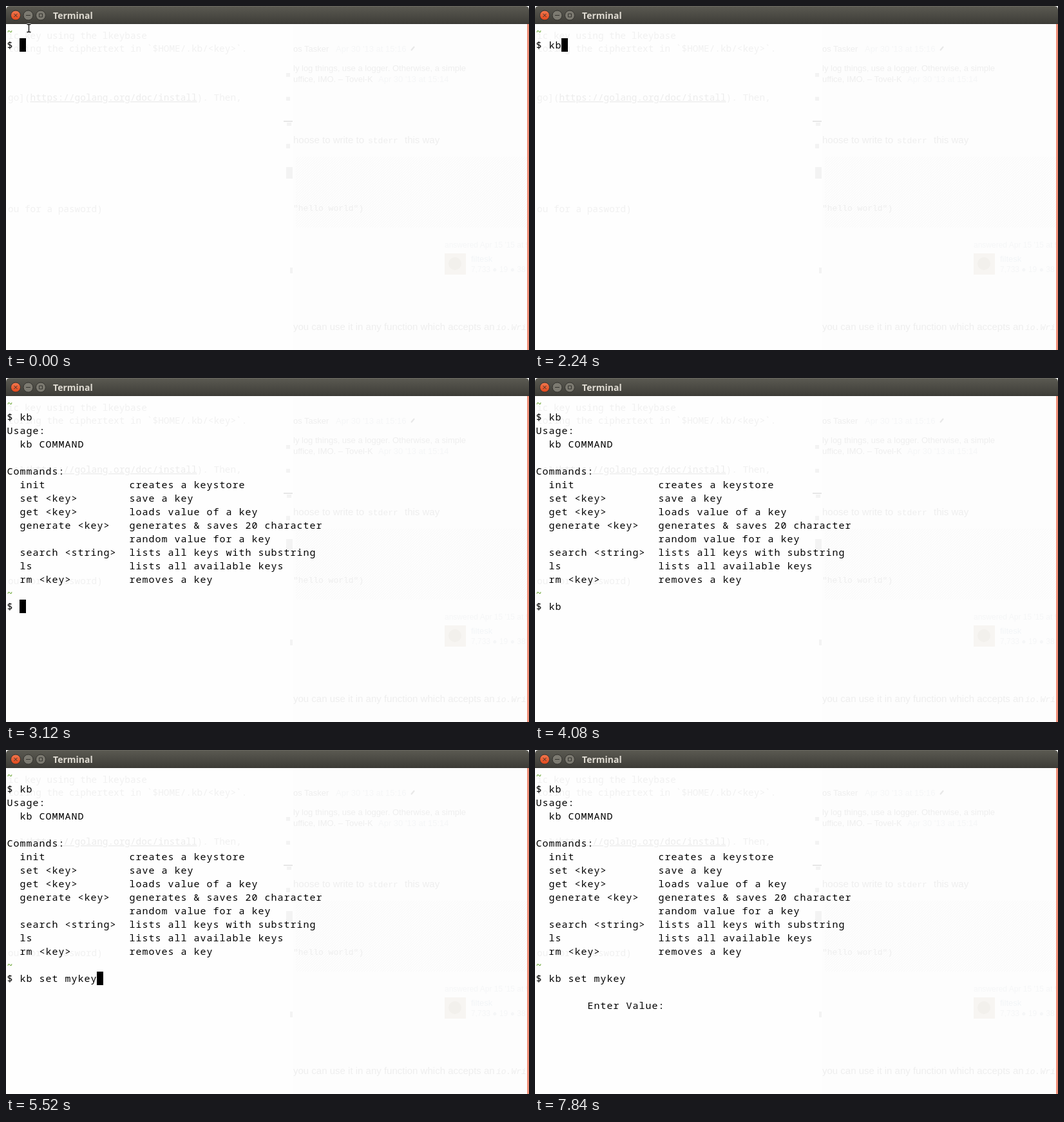
An HTML page that plays this animation: 812x534 px, repeating every 8 s.

```html
<!DOCTYPE html>
<html lang="en">
<head>
<meta charset="utf-8">
<title>Terminal</title>
<style>
  html, body { margin: 0; width: 100%; height: 100%; overflow: hidden; background: #fff; }
  svg, pre, #cursor { position: absolute; }
  svg { left: 0; top: 0; }
  text { white-space: pre; }
  .mono { font-family: "Noto Sans Mono", monospace; font-size: 14.4px; }
  .sans { font-family: "Liberation Sans", sans-serif; font-size: 13px; }
  .large { font-size: 15px; }
  .small { font-size: 12px; }
  .code { font-family: "Liberation Mono", monospace; font-size: 13px; }
  .pale { fill: #f5f6f7; }
  #title { font: bold 14px "Open Sans", sans-serif; fill: #dfdbd2; }
  #screen {
    left: 1.5px; top: 29px; margin: 0; color: #000;
    font: 500 15px/21px "Noto Sans Mono", monospace; letter-spacing: 1px;
  }
  #screen i { font-style: normal; color: #579a1c; }
  #cursor { width: 10px; height: 21px; background: #000; }
</style>
</head>
<body>
<svg width="812" height="534">
  <defs>
    <linearGradient id="bar" x2="0" y2="1">
      <stop offset="0" stop-color="#5b5a52"/>
      <stop offset="1" stop-color="#3d3c37"/>
    </linearGradient>
    <linearGradient id="close" x2="0" y2="1">
      <stop offset="0" stop-color="#f2784f"/>
      <stop offset="1" stop-color="#e0471b"/>
    </linearGradient>
    <pattern id="hatch" width="4" height="4" patternUnits="userSpaceOnUse">
      <path d="M0 4L4 0" stroke="#f8f8f8"/>
    </pattern>
  </defs>

  <!-- windows showing faintly through the terminal -->
  <rect y="28" width="812" height="506" fill="#fefefe"/>
  <rect x="446" y="28" width="363" height="506" fill="#fdfdfd"/>
  <rect x="450" y="234" width="359" height="110" fill="url(#hatch)"/>
  <g class="mono" fill="#f1f1f1">
    <text x="3" y="51">ic key using the lkeybase</text>
    <text x="3" y="71">toring the ciphertext in `$HOME/.kb/&lt;key&gt;`.</text>
    <text x="3" y="147">go](<tspan text-decoration="underline" fill="#ececec">https://golang.org/doc/install</tspan>). Then,</text>
    <text x="3" y="320">ou for a pasword)</text>
  </g>
  <g fill="#f3f3f3">
    <rect x="435" y="104" width="6" height="6"/>
    <rect x="435" y="141" width="6" height="6"/>
    <rect x="431" y="178" width="14" height="2" fill="#e6e6e6"/>
    <rect x="436" y="181" width="7" height="5"/>
    <rect x="435" y="214" width="6" height="7"/>
    <rect x="435" y="250" width="10" height="18"/>
    <rect x="441" y="406" width="4" height="9"/>
  </g>
  <svg width="809" height="534" class="sans" fill="#eeeeee">
    <text x="446" y="71">os Tasker</text>
    <text x="512" y="71" class="pale">Apr 30 '13 at 15:16</text>
    <path d="M629 69l5-6" stroke="#e8e8e8" stroke-width="2"/>
    <text x="446" y="101">ly log things, use a logger. Otherwise, a simple</text>
    <text x="446" y="118">uffice, IMO. – Tovel-K</text>
    <text x="578" y="118" class="pale">Apr 30 '13 at 15:14</text>
    <text x="446" y="213" class="large">hoose to write to</text>
    <text x="562" y="213" class="code">stderr</text>
    <text x="619" y="213" class="large">this way</text>
    <text x="446" y="318" class="code">"hello world")</text>
    <text x="681" y="375" class="small pale">answered Apr 15 '15 at 9:20</text>
    <rect x="681" y="384" width="33" height="33" fill="#f7f5f2"/>
    <circle cx="697" cy="400" r="10" fill="#f2f0ec"/>
    <text x="722" y="397" fill="#f2f5f7">filtesk</text>
    <text x="722" y="413" class="small pale">7,733 ● 19 ● 38</text>
    <text x="446" y="503" class="large">you can use it in any function which accepts an</text>
    <text x="761" y="503" class="code" font-style="italic">io.Writer</text>
  </svg>
  <rect x="809" y="28" width="3" height="506" fill="#f0917a"/>

  <!-- title bar -->
  <path d="M0 28V6Q0 0 6 0H806Q812 0 812 6V28Z" fill="url(#bar)"/>
  <path d="M5 .5H807" stroke="#6b6a62"/>
  <path d="M0 27.5H812" stroke="#353430"/>
  <g stroke="#33322e">
    <circle cx="15" cy="14.5" r="7.5" fill="url(#close)"/>
    <circle cx="34.5" cy="14.5" r="7.5" fill="#7c7a71"/>
    <circle cx="54" cy="14.5" r="7.5" fill="#7c7a71"/>
    <path d="M12.5 12l5 5m0-5l-5 5M31 14.5h7M51.5 12h5v5h-5z" fill="none"/>
  </g>
  <text id="title" x="73" y="20">Terminal</text>

  <g id="pointer" fill="none">
    <path d="M32.5 28.5h2l1 1l1-1h2M35.5 29v11M32.5 40.5h2l1-1l1 1h2" stroke="#fff" stroke-width="3"/>
    <path d="M32.5 28.5h2l1 1l1-1h2M35.5 29v11M32.5 40.5h2l1-1l1 1h2" stroke="#000" stroke-width="1.3"/>
  </g>
</svg>
<pre id="screen"></pre>
<div id="cursor"></div>

<script>
const LOOP = 8000, CELL_W = 10, CELL_H = 21, LEFT = 1, TOP = 29;
const FIRST_KEY = 2160;
const PROMPT = "~\n$ ";
const HELP = `
Usage:
  kb COMMAND

Commands:
  init             creates a keystore
  set <key>        save a key
  get <key>        loads value of a key
  generate <key>   generates & saves 20 character
                   random value for a key
  search <string>  lists all keys with substring
  ls               lists all available keys
  rm <key>         removes a key
`;

// An empty string toggles the cursor; anything else is printed and shows it.
const BLINK = "";
const events = [
  [320, BLINK], [720, BLINK], [1040, BLINK], [1440, BLINK], [1840, BLINK],
  [FIRST_KEY, "k"], [2240, "b"], [2400, HELP + PROMPT],
  [2720, BLINK], [3120, BLINK], [3520, BLINK],
  [3600, "k"], [3680, "b"], [3760, " "], [4080, BLINK], [4480, BLINK],
  [4560, "s"], [4640, "e"], [4720, "t"], [5120, " "],
  [5280, "my"], [5440, "ke"], [5520, "y"], [5920, BLINK], [6320, BLINK],
  [6720, "\n\n        Enter Value: "], [7120, BLINK], [7440, BLINK], [7840, BLINK],
];

const [screenEl, cursorEl, pointerEl] =
  ["screen", "cursor", "pointer"].map(id => document.getElementById(id));
const toHtml = text => text.replace(/&/g, "&amp;").replace(/</g, "&lt;")
  .replace(/~/g, "<i>~</i>");
let shown;

function render(t) {
  let text = PROMPT, cursorOn = true;
  for (const [time, output] of events) {
    if (time > t) break;
    cursorOn = output !== BLINK || !cursorOn;
    text += output;
  }
  if (text !== shown) screenEl.innerHTML = toHtml(shown = text);
  const lines = text.split("\n");
  cursorEl.style.left = LEFT + CELL_W * lines.at(-1).length + "px";
  cursorEl.style.top = TOP + CELL_H * (lines.length - 1) + "px";
  cursorEl.style.visibility = cursorOn ? "visible" : "hidden";
  pointerEl.style.visibility = t < FIRST_KEY ? "visible" : "hidden";
}

const start = performance.now();
function tick() {
  render((performance.now() - start) % LOOP);
  requestAnimationFrame(tick);
}
tick();
</script>
</body>
</html>
```
